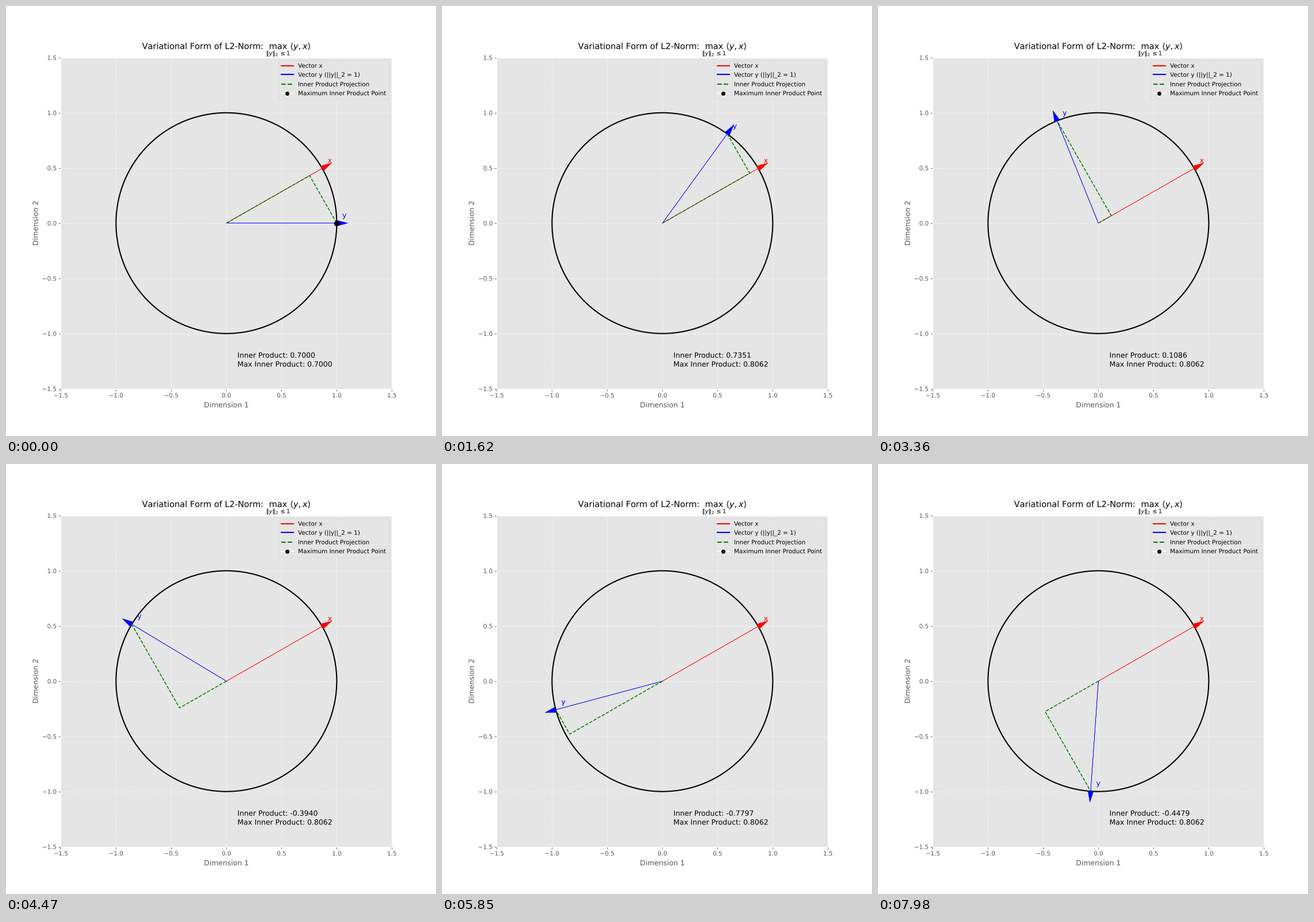
A matplotlib script for the animation above (8 s loop, 748x748 px).

```python
import numpy as np
import matplotlib.pyplot as plt
from matplotlib.animation import FuncAnimation
from matplotlib.lines import Line2D
from matplotlib.patheffects import Normal
from matplotlib.text import Text

LOOP_MS = 8000
FRAMES = 267
X = np.array([0.7, 0.4])
X_UNIT = X / np.linalg.norm(X)

plt.style.use("ggplot")
plt.rcParams["font.family"] = "DejaVu Sans"


def unit(deg):
    a = np.radians(deg)
    return np.array([np.cos(a), np.sin(a)])


# One degree per frame; the running maximum is known ahead of time.
products = np.array([X @ unit(k) for k in range(FRAMES)])
best = np.maximum.accumulate(products)

fig, ax = plt.subplots(figsize=(10, 10), dpi=74.8)
ax.set_xlim(-1.5, 1.5)
ax.set_ylim(-1.5, 1.5)
ax.set_aspect("equal")
ax.grid(True, linestyle="--", alpha=0.7)
ax.set_xlabel("Dimension 1", fontsize=12, labelpad=5)
ax.set_ylabel("Dimension 2", fontsize=12)
ax.set_title(
    r"Variational Form of L2-Norm: $\max_{\|y\|_2 \leq 1} \langle y, x \rangle$",
    fontsize=14,
)


def arrow(v, color):
    return ax.arrow(0, 0, *v, head_width=0.05, head_length=0.1, fc=color, ec=color)


def label(x, y, text="", color="black"):
    return ax.text(x, y, text, color=color, fontsize=12)


ax.add_patch(plt.Circle((0, 0), 1, color="black", fill=False, linewidth=2))
arrow(X_UNIT, "red")
label(*(X_UNIT + 0.05), "x", "red")
y_arrow = arrow(unit(0), "blue")
y_tag = label(*(unit(0) + 0.05), "y", "blue")
(projection,) = ax.plot([], [], "g--", linewidth=1.5)
(peak,) = ax.plot([], [], "ko", markersize=8)
now_text = label(0.1, -1.219)
best_text = label(0.1, -1.3)

ax.legend(
    handles=[
        Line2D([0], [0], color="red", lw=2, label="Vector x"),
        Line2D([0], [0], color="blue", lw=2, label="Vector y (||y||_2 = 1)"),
        Line2D([0], [0], color="green", lw=2, linestyle="--",
               label="Inner Product Projection"),
        Line2D([0], [0], color="w", marker="o", markerfacecolor="black",
               markersize=8, label="Maximum Inner Product Point"),
    ],
    loc="upper right",
    fontsize=10,
    labelspacing=0.545,
    borderpad=0.425,
)


def update(k):
    y = unit(k)
    foot = (y @ X_UNIT) * X_UNIT
    y_arrow.set_data(dx=y[0], dy=y[1])
    y_tag.set_position(y + 0.05)
    projection.set_data([0, foot[0], y[0]], [0, foot[1], y[1]])
    peak.set_data([y[0]], [y[1]])
    peak.set_visible(products[k] >= best[k])
    now_text.set_text(f"Inner Product: {products[k]:.4f}")
    best_text.set_text(f"Max Inner Product: {best[k]:.4f}")
    return y_arrow, y_tag, projection, peak, now_text, best_text


# Outlined glyphs sit at fractional pixels instead of snapping to the grid.
fig.canvas.draw()
for text in fig.findobj(Text):
    text.set_path_effects([Normal()])

anim = FuncAnimation(
    fig, update, frames=FRAMES, init_func=lambda: update(0),
    interval=LOOP_MS / FRAMES, repeat=True, repeat_delay=0, blit=False,
)
plt.show()
```
